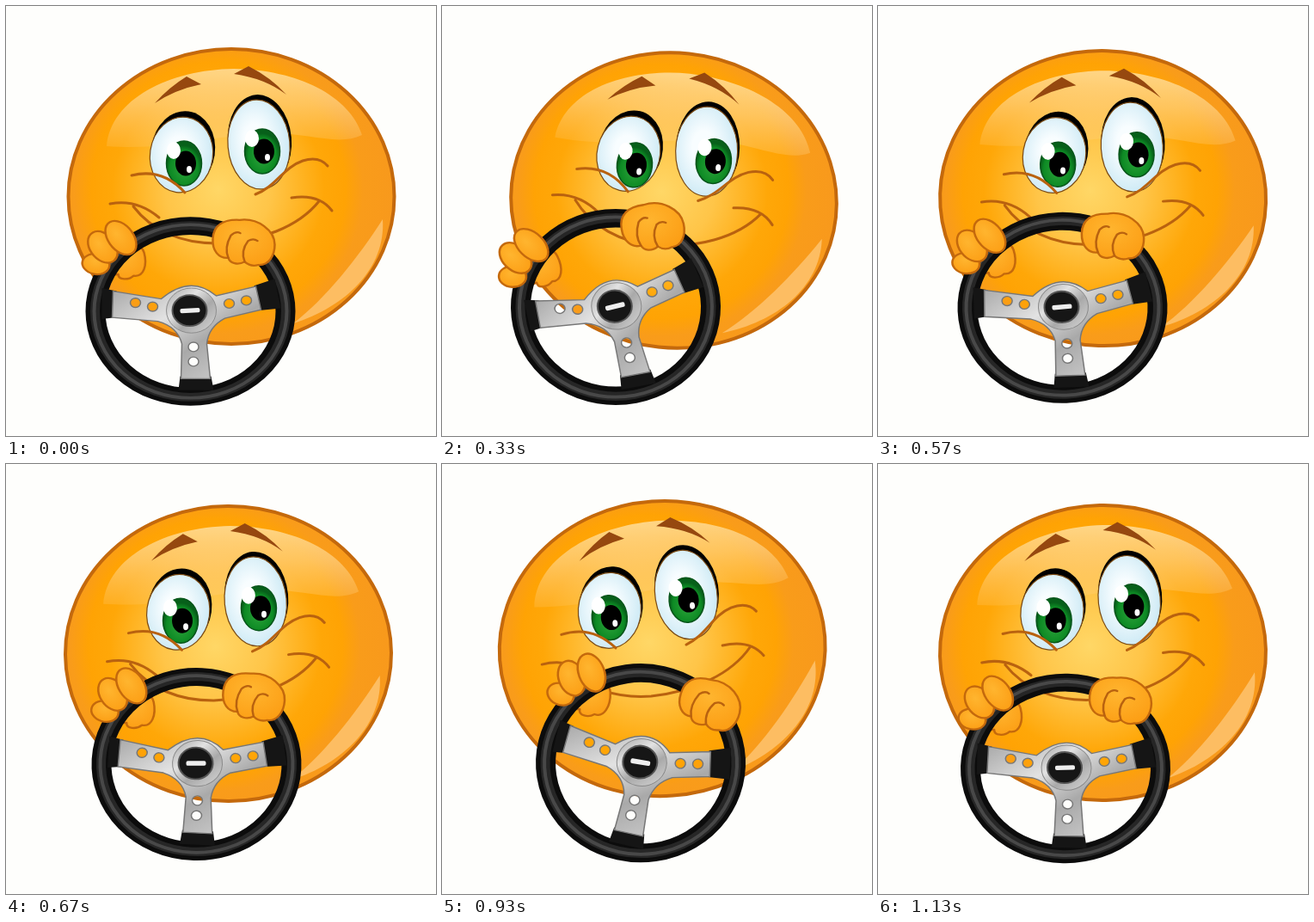
Recreate the animation shown at these times as an HTML page. Size 500x500 px, loop 1160 ms.

```html
<!DOCTYPE html>
<html>
<head>
<meta charset="utf-8">
<style>
  html, body { margin: 0; height: 100%; overflow: hidden; background: #fefefc; }
  svg { display: block; width: 100vw; height: 100vh; }
  .line { fill: none; stroke: #b9620f; stroke-width: 3; stroke-linecap: round; stroke-linejoin: round; }
  .skin { fill: url(#skin); stroke: #c4690c; stroke-width: 2.5; stroke-linejoin: round; }
  .eye { fill: url(#eye); stroke: #7a4a14; stroke-width: 1.2; }
</style>
</head>
<body>
<svg viewBox="0 0 500 500">
  <defs>
    <radialGradient id="face" gradientUnits="userSpaceOnUse" cx="247" cy="213" r="205">
      <stop offset="0" stop-color="#ffd766"/><stop offset=".3" stop-color="#ffc548"/>
      <stop offset=".6" stop-color="#ffa708"/><stop offset=".72" stop-color="#ffa304"/>
      <stop offset=".82" stop-color="#f99c1a"/><stop offset="1" stop-color="#f8991c"/>
    </radialGradient>
    <linearGradient id="shine" x2="0" y2="1">
      <stop offset="0" stop-color="#ffdb94" stop-opacity=".9"/>
      <stop offset=".45" stop-color="#ffd58a" stop-opacity=".65"/>
      <stop offset="1" stop-color="#ffd080" stop-opacity=".2"/>
    </linearGradient>
    <radialGradient id="eye" cx=".45" cy=".45" r=".6">
      <stop offset=".3" stop-color="#f8fdff"/><stop offset="1" stop-color="#c9e8f4"/>
    </radialGradient>
    <radialGradient id="iris" cy=".6">
      <stop offset="0" stop-color="#2fa53c"/><stop offset=".8" stop-color="#0d8a24"/>
      <stop offset="1" stop-color="#07601a"/>
    </radialGradient>
    <radialGradient id="skin" cx=".45" cy=".35" r=".75">
      <stop offset="0" stop-color="#ffb52f"/><stop offset="1" stop-color="#fc9c12"/>
    </radialGradient>
    <linearGradient id="metal" x2="1" y2="1">
      <stop offset="0" stop-color="#a5a5a5"/><stop offset=".35" stop-color="#e2e2e2"/>
      <stop offset=".6" stop-color="#a9a9a9"/><stop offset="1" stop-color="#d8d8d8"/>
    </linearGradient>
    <g id="pupil">
      <ellipse rx="20.500" ry="26" fill="url(#iris)" stroke="#07551a" stroke-width="1.5"/>
      <ellipse cx="2" cy="0" rx="12" ry="14.500"/>
      <ellipse cx="-12" cy="-15" rx="8" ry="10" fill="#fff"/>
      <ellipse cx="6" cy="7" rx="3" ry="4" fill="#fff"/>
    </g>
  </defs>

  <g id="head">
    <ellipse cx="262" cy="221.5" rx="189.5" ry="171.5" fill="url(#face)" stroke="#c4690c" stroke-width="4"/>
    <path fill="url(#shine)" d="M117 163C122 108 190 74 265 73C340 74 400 105 414 150C385 164 350 146 300 148C230 152 190 168 117 163Z"/>
    <path fill="#fdbd62" d="M438 248C442 305 395 350 334 369C370 342 410 292 438 248Z"/>

    <ellipse cx="206" cy="168" rx="37" ry="46" transform="rotate(8 206 168)"/>
    <ellipse class="eye" cx="204" cy="173" rx="36.5" ry="44" transform="rotate(8 204 173)"/>
    <ellipse cx="295" cy="156" rx="37" ry="53" transform="rotate(-5 295 156)"/>
    <ellipse class="eye" cx="294" cy="161" rx="36" ry="52" transform="rotate(-5 294 161)"/>
    <g id="gaze">
      <use href="#pupil" x="207" y="183"/>
      <use href="#pupil" x="298" y="169"/>
    </g>

    <g class="line">
      <path d="M146 197Q182 188 208 217"/>
      <path d="M290 219C314 210 322 188 345 180Q364 174 374 186"/>
      <path d="M121 230Q152 224 178 246M148 233C170 262 205 276 245 276C295 274 340 257 364 227"/>
      <path d="M332 223Q364 218 379 238"/>
    </g>
    <g fill="#96480f">
      <path d="M173 113Q190 94 210 82L227 91Q197 97 173 113Z"/>
      <path d="M265 79L282 70Q308 83 326 103Q301 84 265 79Z"/>
    </g>
  </g>

  <g id="wheel">
    <path class="skin" d="M-98-58C-96-90-60-97-54-76C-50-60-54-44-66-46C-72-40-84-40-84-48C-92-46-98-50-98-58Z"/>
    <g fill="none">
      <circle r="110.500" stroke="#0c0c0c" stroke-width="23"/>
      <circle r="111" stroke="#262626" stroke-width="11"/>
      <circle r="112" stroke="#484848" stroke-width="4"/>
    </g>
    <path fill="#151515" d="M-103-30L-86-26L-88 8L-103 10ZM74-33L98-42L105-4L80-1ZM-12 84L24 84L27 102L-14 102Z"/>
    <path fill="url(#metal)" fill-rule="evenodd" stroke="#777" stroke-width="1.5"
      d="M-90-26L-34-16Q0-48 30-20L76-32L82-2L40 9Q21 20 19 42L23 87H-11L-10 42Q-15 20-38 13L-91 8Z
         M-70-11a6 6 0 1 0 12 0a6 6 0 1 0-12 0ZM-50-6a6 6 0 1 0 12 0a6 6 0 1 0-12 0Z
         M39-10a6 6 0 1 0 12 0a6 6 0 1 0-12 0ZM59-14a6 6 0 1 0 12 0a6 6 0 1 0-12 0Z
         M-2.500 46a6 6 0 1 0 12 0a6 6 0 1 0-12 0ZM-2.500 65a6 6 0 1 0 12 0a6 6 0 1 0-12 0Z"/>
    <circle cx="1" cy="-1" r="29" fill="url(#metal)" stroke="#8a8a8a"/>
    <circle cx="-1" cy="-1" r="20" fill="#161616" stroke="#555" stroke-width="2"/>
    <rect x="-12" y="-4" width="23" height="6" rx="2" fill="#eee" transform="rotate(-3)"/>

    <g class="skin">
      <ellipse cx="-110" cy="-61" rx="16" ry="13" transform="rotate(15 -110 -61)"/>
      <ellipse cx="-102" cy="-83" rx="15" ry="22" transform="rotate(-32 -102 -83)"/>
      <ellipse cx="-81" cy="-95" rx="15" ry="24" transform="rotate(-32 -81 -95)"/>
      <path d="M26-94C27-112 39-119 57-118C79-121 98-104 98-86C98-72 91-59 79-60C73-58 67-60 63-64C55-59 46-62 44-69C33-68 25-78 26-94Z"/>
    </g>
    <path class="line" style="stroke-width:2.500" d="M44-69Q39-82 47-98Q53-104 58-101M63-64Q58-78 67-91Q73-95 78-91"/>
  </g>
</svg>
<script>
const FRAMES = 35, LOOP = 1160;
// step, head x, y, angle, wheel x, y, vertical scale, angle
const poses = [
  [0, 262, 221.5, 0, 214.5, 355, .9, 0],
  [5, 268, 223, 5, 207, 350, .932, -8.1],
  [10, 269.5, 226, 6, 202, 350, .935, -11.5],
  [14, 265, 226, 3.5, 208, 352, .91, -6.9],
  [20, 258.5, 220.5, -.3, 221.5, 349, .918, 3.1],
  [25, 255, 215, -4.3, 233, 346.5, .955, 13.7],
  [31, 258.5, 215.5, -3, 226, 350, .93, 9.7],
  [34, 261.5, 219.5, -1.2, 218, 354, .903, 1.3],
];
const [head, gaze, wheel] = ['head', 'gaze', 'wheel'].map(id => document.getElementById(id));

function pose(i) {
  const n = poses.length, turn = Math.floor(i / n);
  const [step, ...values] = poses[i - turn * n];
  return [step + turn * FRAMES, ...values];
}

// Cubic Hermite spline through the looping poses
function poseAt(step) {
  const i = poses.findLastIndex(p => p[0] <= step);
  const [a, b, c, d] = [-1, 0, 1, 2].map(k => pose(i + k));
  const span = c[0] - b[0], u = (step - b[0]) / span;
  return b.map((from, j) => {
    const to = c[j];
    const m0 = (to - a[j]) / (c[0] - a[0]) * span;
    const m1 = (d[j] - from) / (d[0] - b[0]) * span;
    const rise = to - from;
    return from + u * (m0 + u * (3 * rise - 2 * m0 - m1 + u * (m0 + m1 - 2 * rise)));
  });
}

function draw() {
  const t = Math.floor(performance.now() % LOOP / 10) * 10;
  const step = Math.floor((t + 3.4) * .03);
  const [, hx, hy, ha, wx, wy, ws, wa] = poseAt(step);
  head.setAttribute('transform', `translate(${hx} ${hy}) rotate(${ha}) translate(-262 -221.5)`);
  gaze.setAttribute('transform', `translate(${ha * .9} ${ha * .4})`);
  wheel.setAttribute('transform', `translate(${wx} ${wy}) scale(1 ${ws}) rotate(${wa})`);
  requestAnimationFrame(draw);
}
draw();
</script>
</body>
</html>
```
